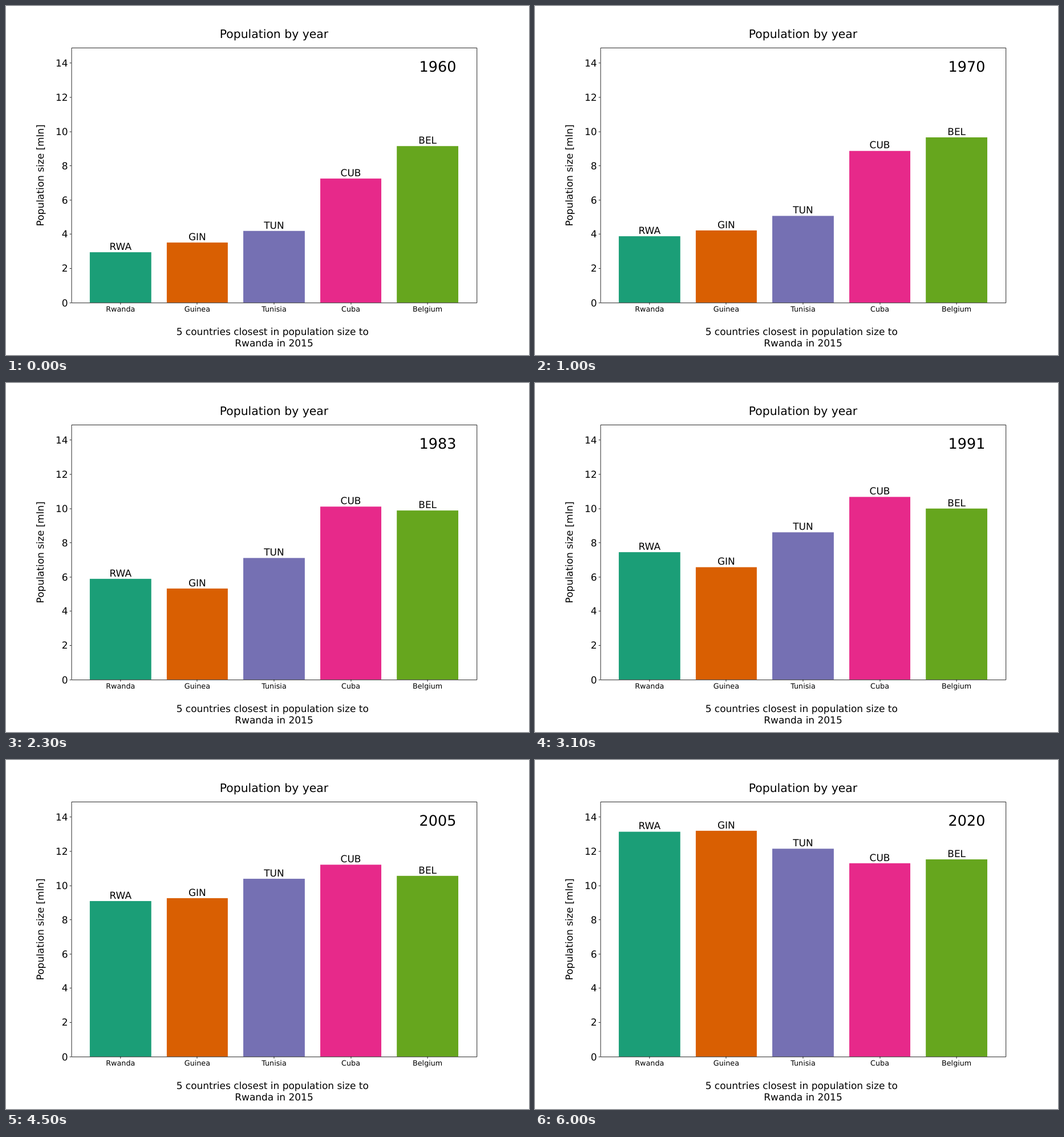
These frames come from a looping animation (917x611 px, 6.1 s). An HTML page:

```html
<!DOCTYPE html>
<html lang="en">
<head>
<meta charset="utf-8">
<title>Population by year</title>
<style>
  html, body { margin: 0; width: 100%; height: 100%; overflow: hidden; background: #fff; }
  svg { display: block; width: 100vw; height: 100vh; }
  text { font: 20px "DejaVu Sans", sans-serif; text-anchor: middle; text-rendering: geometricPrecision; }
  .title { font-size: 24px; }
  .year { font-size: 30px; }
  .name { font-size: 15px; }
  .tick { text-anchor: end; }
  .axis { fill: none; stroke: #000; stroke-width: 1; }
</style>
</head>
<body>
<svg id="chart" viewBox="0 0 1080 720" preserveAspectRatio="none"></svg>
<script>
const STEP = 100, YEARS = 61, FIRST = 1960;
const LEFT = 135, RIGHT = 972, TOP = 86.5, BASE = 612, UNIT = 35.3;
const PITCH = (RIGHT - LEFT) / 5.28;

// pop: millions of people, one key point per decade
const series = [
  { name: 'Rwanda', color: '#1b9e77', code: 'RWA', pop: [2.96, 3.89, 5.28, 7.34, 8.13, 10.31, 13.15],
    dip: t => 2.13 * Math.exp(-(((t - 35.4) / 1.7) ** 2)) },
  { name: 'Guinea', color: '#d95f02', code: 'GIN', pop: [3.51, 4.22, 4.95, 6.41, 8.37, 10.28, 13.2] },
  { name: 'Tunisia', color: '#7570b3', code: 'TUN', pop: [4.2, 5.06, 6.57, 8.44, 9.89, 10.9, 12.16] },
  { name: 'Cuba', color: '#e7298a', code: 'CUB', pop: [7.26, 8.87, 9.84, 10.63, 11.11, 11.29, 11.3] },
  { name: 'Belgium', color: '#66a61e', code: 'BEL', pop: [9.16, 9.66, 9.84, 9.98, 10.25, 10.94, 11.54] }
];

const chart = document.getElementById('chart');

function add(tag, attrs, content = '') {
  const el = document.createElementNS('http://www.w3.org/2000/svg', tag);
  for (const key in attrs) el.setAttribute(key, attrs[key]);
  el.textContent = content;
  chart.append(el);
  return el;
}

const label = (x, y, content, cls = '') => add('text', { x, y, class: cls }, content);
const line = d => add('path', { d, class: 'axis' });

// smooth curve through the key points
function population({ pop, dip = () => 0 }, t) {
  const last = pop.length - 1;
  const i = Math.min(Math.floor(t / 10), last - 1);
  const u = t / 10 - i, v = 1 - u;
  const slope = k => {
    const a = Math.max(k - 1, 0), b = Math.min(k + 1, last);
    return (pop[b] - pop[a]) / (b - a);
  };
  return v * v * ((1 + 2 * u) * pop[i] + u * slope(i))
    + u * u * ((1 + 2 * v) * pop[i + 1] - v * slope(i + 1)) - dip(t);
}

series.forEach((s, i) => {
  const mid = LEFT + PITCH * (i + 0.64);
  const x = Math.round(mid - PITCH * 0.4);
  s.bar = add('rect', { x, width: Math.round(mid + PITCH * 0.4) - x, fill: s.color });
  s.tag = label(mid, 0, s.code);
  line(`M${Math.floor(mid) + 0.5} ${BASE}v4`);
  label(mid, 631, s.name, 'name');
});

for (let v = 0; v <= 14; v += 2) {
  const y = Math.floor(BASE - v * UNIT) + 0.5;
  line(`M${LEFT} ${y}h-3.5`);
  label(128, y + 7, v, 'tick');
}

line(`M${LEFT + 0.5} ${TOP}H${RIGHT + 0.5}V${BASE + 0.5}H${LEFT + 0.5}z`);
label(553.5, 66, 'Population by year', 'title');
label(550.3, 679, '5 countries closest in population size to');
label(553.5, 702, 'Rwanda in 2015');
label(0, 0, 'Population size [mln]').setAttribute('transform', 'translate(77.4 349.2) rotate(-90)');
const year = label(891.5, 135, '', 'year');

let shown = -1;

function draw(now) {
  const n = Math.floor(now / STEP) % YEARS;
  if (n !== shown) {
    shown = n;
    year.textContent = FIRST + n;
    for (const s of series) {
      const y = Math.round(BASE - population(s, n) * UNIT);
      s.bar.setAttribute('y', y);
      s.bar.setAttribute('height', BASE - y);
      s.tag.setAttribute('y', y - 5);
    }
  }
  requestAnimationFrame(draw);
}

draw(0);
</script>
</body>
</html>
```
